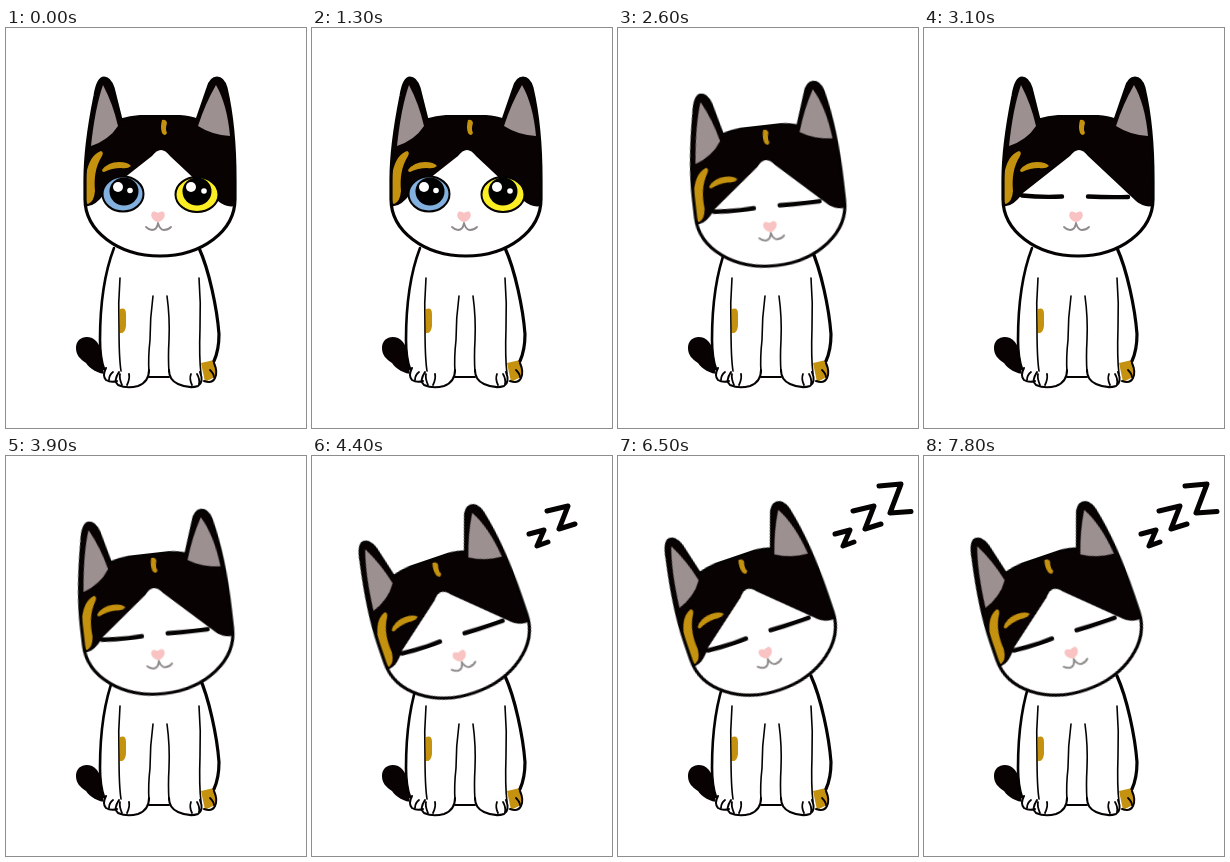
An HTML page that plays this animation: 300 px wide and 400 px high, repeating every 8 s.

```html
<!DOCTYPE html>
<html lang="en">
<head>
<meta charset="utf-8">
<title>Sleepy cat</title>
<style>
  html, body { margin: 0; width: 100%; height: 100%; overflow: hidden; background: #fff; }
  svg { display: block; width: 300px; height: 400px; }
  .line { fill: none; stroke: #050202; stroke-linecap: round; stroke-linejoin: round; }
  .fur { fill: #080203; }
  .gold { fill: #c4920f; }
  .ear { fill: #9c9090; }
  #body { stroke-width: 2.6; }
  #head { transform-origin: 152px 188px; }
  #zs { stroke-width: 5; }
</style>
</head>
<body>
<svg viewBox="0 0 300 400">
  <defs>
    <path id="skull" d="M79 152 C79 130 83 98 89 68 C91 55 94 50 98 50 C102 50 105 54 107 60 L115 92
      Q124 89 134 88.5 H174 Q184 89 191 92 L202 60 C204 53 207 50 211 50 C215 50 218 53 220 60
      C227 90 229 125 229 152 V171 C229 203 196 228 154 228 C112 228 79 203 79 171 Z"/>
    <clipPath id="inside"><use href="#skull"/></clipPath>
  </defs>

  <path class="fur" d="M70 320 C70 311 78 307 86 310 C94 314 96 324 98 333 L101 346 C92 346 84 341 80 335 C74 331 70 327 70 320 Z"/>
  <g id="body" class="line">
    <path fill="#fff" stroke="none" d="M107 220 C97 246 94 280 94 312 L98 349 H207 L213 310 C211 280 204 246 193 220 Z"/>
    <path class="gold" stroke="none" d="M195 335 L208 332 Q211 341 209 349 L199 354 Z"/>
    <path class="gold" stroke="none" d="M114 281 Q120 279 120 286 V298 Q119 306 114 305 Z"/>
    <path d="M108 220 C98 246 94 280 94 312 Q94 330 98 341"/>
    <path stroke-width="3.2" d="M193 220 C203 242 211 280 213 306 Q213 322 208 333"/>
    <path stroke-width="2" d="M143 349 H163"/>
    <path stroke-width="2" d="M100 340 Q96 348 100 352 Q105 355 111 353 M113 344 Q107 353 112 357 Q121 361 132 358 Q143 354 143 342"/>
    <path stroke-width="2" d="M163 342 Q163 352 172 356 Q183 361 192 358 Q198 354 194 344 M198 353 Q206 356 209 350 Q212 344 208 335"/>
    <path stroke-width="1.6" d="M114 250 Q112 275 113 300 Q113 330 115 343 M147 268 Q144 290 144 312 Q142 330 143 344
      M161 268 Q164 290 163 312 Q162 330 163 344 M193 250 Q195 275 194 300 Q193 330 195 346"/>
    <path stroke-width="1.8" d="M114 346 Q113 350 116 357 M123 346 Q124 351 121 357 M185 346 Q183 351 186 357
      M191 346 Q194 351 193 356 M107 344 Q103 347 103 352 M204 342 Q208 346 208 349"/>
  </g>

  <g id="head">
    <use href="#skull" fill="#fff"/>
    <path class="fur" clip-path="url(#inside)" d="M70 40 H240 V178 H229 Q220 180 212 173
      L164 128 Q155 116 146 128 L99 165 Q88 180 79 178 H70 Z"/>
    <path class="ear" d="M97 57 Q89 80 85 118 Q103 112 112 98 Q107 76 97 57 Z"/>
    <path class="ear" d="M210 57 Q199 76 192 98 Q206 107 224 108 Q221 76 210 57 Z"/>
    <path class="gold" d="M156 92 Q160 91 161 95 Q159 101 161 105 Q159 109 156 105 Q154 99 156 92 Z"/>
    <path class="gold" d="M96 142 Q102 134 113 134 Q122 134 125 138 Q122 141 115 140 Q106 140 98 144 Q96 144 96 142 Z"/>
    <path class="gold" d="M95 123 Q98 124 96 128 C89 139 88 151 89 163 Q88 174 82 176 Q79 175 79 168 C78 145 83 127 95 123 Z"/>
    <use href="#skull" class="line" stroke-width="3.2"/>
    <g id="open">
      <g class="line" stroke-width="2">
        <ellipse cx="117" cy="166" rx="20.5" ry="17.5" style="fill:#82b1df"/>
        <ellipse cx="191" cy="166.5" rx="21.5" ry="17.5" style="fill:#fbee25"/>
      </g>
      <ellipse cx="118" cy="163.5" rx="14.5" ry="14"/>
      <ellipse cx="191" cy="163.5" rx="14.5" ry="14"/>
      <g fill="#fff">
        <circle cx="112" cy="159" r="5"/><circle cx="124" cy="162.5" r="2.8"/>
        <circle cx="185" cy="159" r="5"/><circle cx="198" cy="163" r="2.8"/>
      </g>
    </g>
    <path id="shut" class="line" stroke-width="4.4" d="M98 167.5 Q118 169.5 138 168.5 M164 168.500 Q184 169.500 204 169"/>
    <path fill="#f8c3c2" d="M152 185 Q154 183 157 183.5 Q160 186 158 190 Q155 194 152 194 Q149 194 146 190 Q144 186 147 183.5 Q150 183 152 185 Z"/>
    <path class="line" style="stroke:#8f8b8b" stroke-width="1.8" d="M140 199 Q143 202 146 202 Q151 202 152 195 Q154 202 158 202 Q162 202 165 199"/>
  </g>

  <g id="zs" class="line">
    <path d="M217 78 L232 74 L225 90 L236 86"/>
    <path d="M235 55 L256 50 L247 73 L263 68"/>
    <path id="z3" d="M261 30 L283 28 L272 57 L293 55.5"/>
  </g>
</svg>
<script>
const LOOP = 8000;
const pose = (x, y, turn, awake, zs) => ({ x, y, turn, awake, zs });
const AWAKE = pose(0, 0, 0, 1, 0), BLINK = pose(0, 0, 0, 0, 0), NOD = pose(0, 10, -6.5, 0, 0);
const BREATHE = pose(-4.5, 11.5, -18.8, 0, 2), SNORE = pose(-4.5, 8.5, -18.8, 0, 3);

const steps = [
  [0, AWAKE], [500, BLINK], [1300, AWAKE], [1800, BLINK], [2600, NOD], [3100, BLINK], [3900, NOD],
  [4400, BREATHE], [5200, SNORE], [5700, BREATHE], [6500, SNORE], [7000, BREATHE], [7800, SNORE]
];

function play(id, style) {
  const frames = steps.map(([t, p]) => ({ offset: t / LOOP, easing: "step-end", ...style(p) }));
  frames.push({ ...frames[frames.length - 1], offset: 1 });
  document.getElementById(id).animate(frames, { duration: LOOP, iterations: Infinity });
}

const show = on => ({ visibility: on ? "visible" : "hidden" });

play("head", p => ({ transform: `translate(${p.x}px, ${p.y}px) rotate(${p.turn}deg)` }));
play("open", p => show(p.awake));
play("shut", p => show(!p.awake));
play("zs", p => show(p.zs > 0));
play("z3", p => show(p.zs > 2));
</script>
</body>
</html>
```
